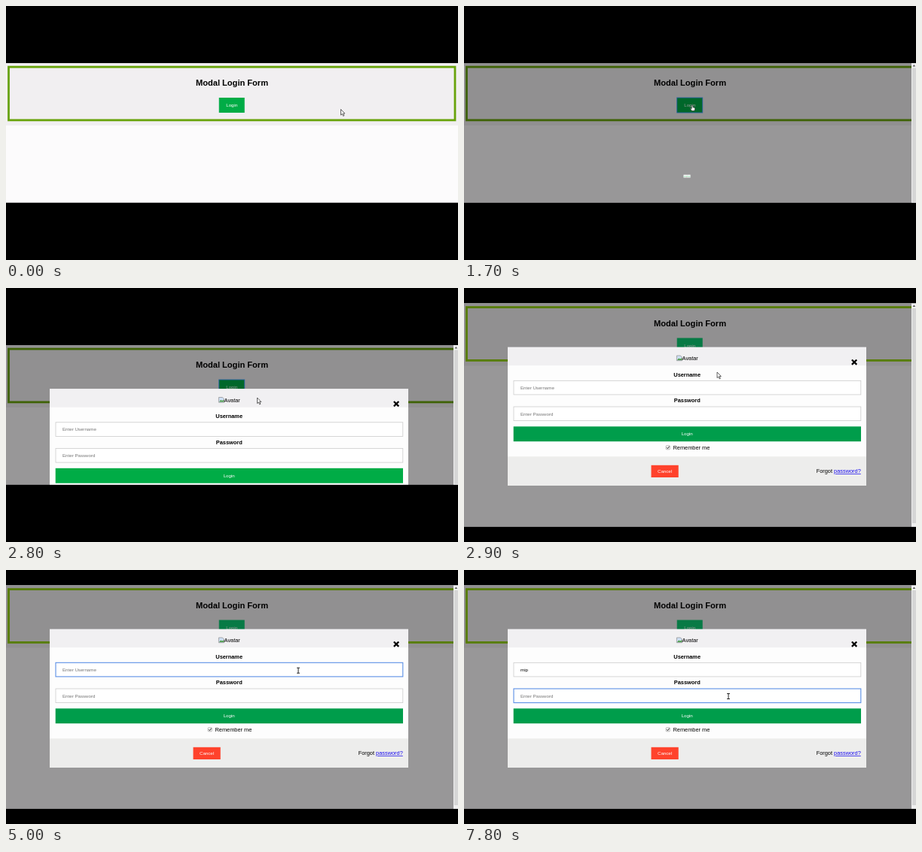
Write an HTML page that moves like this. It is 600 by 338 pixels and loops after 8 s.

```html
<!DOCTYPE html>
<html lang="en">
<head>
<meta charset="utf-8">
<title>Modal login form</title>
<style>
  html, body { margin: 0; width: 100%; height: 100%; overflow: hidden; background: #000; }
  svg { display: block; width: 600px; height: 338px; }
  text { font: 7.4px "Liberation Sans", Arial, sans-serif; fill: #000; }
  .mid { text-anchor: middle; }
  .bold { font-weight: bold; }
  .title { font-size: 11.1px; }
  .small { font-size: 6.17px; }
  .white { fill: #fff; }
  .hint { fill: #757575; }
  .tip { font: 6.7px "Noto Sans", "Open Sans", sans-serif; fill: #fff; }
  .field { fill: #fff; stroke: #ccc; stroke-width: .8; }
  .field.focus { stroke: #5b8fe6; stroke-width: 1.1; }
</style>
</head>
<body>
<svg viewBox="0 0 600 338">
  <defs>
    <clipPath id="view"><rect id="viewBox" width="600"/></clipPath>
  </defs>
  <rect width="600" height="338" fill="#000"/>
  <g clip-path="url(#view)">
    <g id="page">
      <rect y="20" width="600" height="300" fill="#fcfbfc"/>
      <rect y="20" width="600" height="83.5" fill="#f1eff1"/>
      <rect id="frame" x="3.5" y="25.6" width="592.5" height="70.8" fill="none" stroke-width="2.8"/>
      <text class="mid bold title" x="300" y="50.7">Modal Login Form</text>
      <rect id="open" x="282.7" y="66.5" width="34" height="20"/>
      <text class="mid small white" x="299.8" y="78.7">Login</text>

      <g id="shade">
        <rect y="20" width="600" height="300" fill="#000" opacity=".4"/>
        <rect id="ring" x="282.7" y="66.5" width="34" height="20" fill="none" stroke="#2b62a0" stroke-width=".9"/>
        <rect x="594" y="20" width="6" height="300" fill="#f0f0f0"/>
        <rect x="595" y="27" width="5" height="286" fill="#d6d6d6"/>
        <path d="M595.6 25 l1.8 -2.4 l1.8 2.4z" fill="#555"/>
      </g>

      <g id="modal">
        <rect x="58" y="78.8" width="476" height="184.2" fill="#fdfdfd"/>
        <rect x="58" y="78.8" width="476" height="24.4" fill="#f1f0f2"/>
        <rect x="58" y="224.3" width="476" height="38.7" fill="#ededec"/>

        <path d="M282.4 90 h5 l2 2 v4.7 h-7z" fill="#cfe0f5" stroke="#8a8a8a" stroke-width=".7"/>
        <path d="M283 96 l2.2 -2.8 l1.6 1.6 l2.2 -1.8 v3z" fill="#4f9d4a"/>
        <text x="289.6" y="96.3">Avatar</text>
        <path d="M514.9 95.5 l6.4 6.4 M521.3 95.5 l-6.4 6.4" stroke="#000" stroke-width="2.2"/>

        <text class="mid bold" x="296.2" y="117.5">Username</text>
        <rect id="user" class="field" x="66" y="123.3" width="460.8" height="18.6"/>
        <text id="userText" class="small" x="75" y="134.7"></text>

        <text class="mid bold" x="296.2" y="152.2">Password</text>
        <rect id="pass" class="field" x="66" y="158" width="460.8" height="18.6"/>
        <text class="small hint" x="75" y="169.5">Enter Password</text>

        <rect id="send" x="65.7" y="184.3" width="461.3" height="19.9"/>
        <text class="mid small white" x="296.2" y="196.4">Login</text>

        <rect x="268.2" y="209.8" width="5" height="5" rx=".6" fill="#fff" stroke="#888" stroke-width=".6"/>
        <path d="M269.1 212.3 l1.3 1.4 l2.2 -3" fill="none" stroke="#222" stroke-width="1"/>
        <text x="277.5" y="215.2">Remember me</text>

        <rect x="248.5" y="235.8" width="36.2" height="16.2" fill="#ff422c"/>
        <text class="mid small white" x="266.6" y="246.1">Cancel</text>
        <text x="526.8" y="246.1" text-anchor="end">Forgot <tspan fill="#1a0dee" text-decoration="underline">password?</tspan></text>
      </g>

      <g id="tip">
        <rect x="393.8" y="143.8" width="81.3" height="11.8" rx="1" fill="#222"/>
        <text class="tip" x="398" y="152">Please fill out this field.</text>
      </g>
    </g>
  </g>

  <g id="cursor">
    <path id="arrow" d="M0 0 V7.6 L1.8 6 L3.1 8.9 L4.4 8.3 L3.1 5.5 H5.3z" fill="#fff" stroke="#222" stroke-width=".7"/>
    <path id="hand" d="M-.8 .6 Q0 -.5 .8 .6 V2.8 L3.6 3.4 V5.2 L2.9 7.4 H-.6 L-2.6 4.6 L-1.9 3.9 L-.8 4.7z" fill="#fff" stroke="#222" stroke-width=".6"/>
    <path id="beam" d="M-1.9 -3.5 H1.9 M-1.9 3.5 H1.9 M0 -3.5 V3.5" fill="none" stroke="#222" stroke-width="1"/>
  </g>
</svg>
<script>
  const LOOP = 8000, STEP = 100;
  const CUT = 2900;      // the window grows
  const OPEN = 1680;     // the dialog starts to zoom in
  const ZOOM = 600;

  const $ = id => document.getElementById(id);
  const set = (id, attrs) => {
    for (const k in attrs) $(id).setAttribute(k, attrs[k]);
  };
  const show = (id, on) => set(id, { display: on ? "inline" : "none" });

  // time, x, y
  const route = [
    [0, 444.5, 137.5], [200, 432, 138], [500, 362, 136], [800, 304, 132.5], [900, 303, 132],
    [2300, 303, 132], [2700, 333.5, 146], [2899, 333.5, 146],
    [2900, 336, 112], [3200, 336, 112], [3600, 390, 137],
    [4000, 390, 137], [4400, 388, 133.7], [6500, 388, 133.7],
    [7300, 351, 168], [8000, 351, 168]
  ];
  const typing = [[5200, 1], [5700, 2], [6000, 3]];
  const tipFade = [[0, 0], [3500, .3], [3600, .85], [3900, .22], [4000, 0]];
  const NAME = "mip";

  const held = (steps, t, first) =>
    steps.reduce((v, [at, value]) => t >= at ? value : v, first);

  function place(t) {
    const i = Math.max(1, route.findIndex(p => p[0] > t));
    const [t0, x0, y0] = route[i - 1], [t1, x1, y1] = route[i];
    const k = (t - t0) / (t1 - t0), e = k * k * (3 - 2 * k);
    return [x0 + (x1 - x0) * e, y0 + (y1 - y0) * e];
  }

  // cubic-bezier(.25, .1, .25, 1)
  function ease(x) {
    if (x <= 0) return 0;
    if (x >= 1) return 1;
    const curve = (a, b, s) => 3 * a * s * (1 - s) ** 2 + 3 * b * s * s * (1 - s) + s ** 3;
    let lo = 0, hi = 1;
    for (let i = 0; i < 24; i++) {
      const m = (lo + hi) / 2;
      if (curve(.25, .25, m) < x) lo = m; else hi = m;
    }
    return curve(.1, 1, lo);
  }

  function draw(t) {
    const large = t >= CUT, opened = t >= OPEN;
    const [x, y] = place(t);
    const hover = !opened && t >= 800;

    set("viewBox", large ? { y: 20.5, height: 297.3 } : { y: 76, height: 185.8 });
    set("page", { transform: `translate(0 ${large ? 0 : 55.5})` });
    set("frame", { stroke: large ? "#91d000" : "#68a30a" });
    set("open", { fill: large ? "#0ccb72" : hover ? "#29b765" : "#00ac46" });
    set("send", { fill: large ? "#009d4b" : "#00ac46" });

    show("shade", opened);
    show("ring", !large);
    show("modal", opened);
    const zoom = ease((t - OPEN) / ZOOM);
    set("modal", { transform: `translate(296 171) scale(${zoom}) translate(-296 -171)` });

    const count = held(typing, t, 0);
    $("userText").textContent = count ? NAME.slice(0, count) : "Enter Username";
    $("userText").classList.toggle("hint", !count);
    $("user").classList.toggle("focus", t >= 4000 && t < 7400);
    $("pass").classList.toggle("focus", t >= 7400);
    set("tip", { opacity: held(tipFade, t, 0) });

    const inside = (top, bottom) => y > top && y < bottom;
    const beam = large && (inside(123, 142) || inside(157.5, 177));
    const hand = t >= 800 && t < 2300;
    show("beam", beam);
    show("hand", hand);
    show("arrow", !beam && !hand);
    set("cursor", { transform: `translate(${x} ${y})` });
  }

  const start = performance.now();
  function tick() {
    const t = (performance.now() - start) % LOOP;
    draw(Math.floor(t / STEP) * STEP);
    requestAnimationFrame(tick);
  }
  tick();
</script>
</body>
</html>
```
